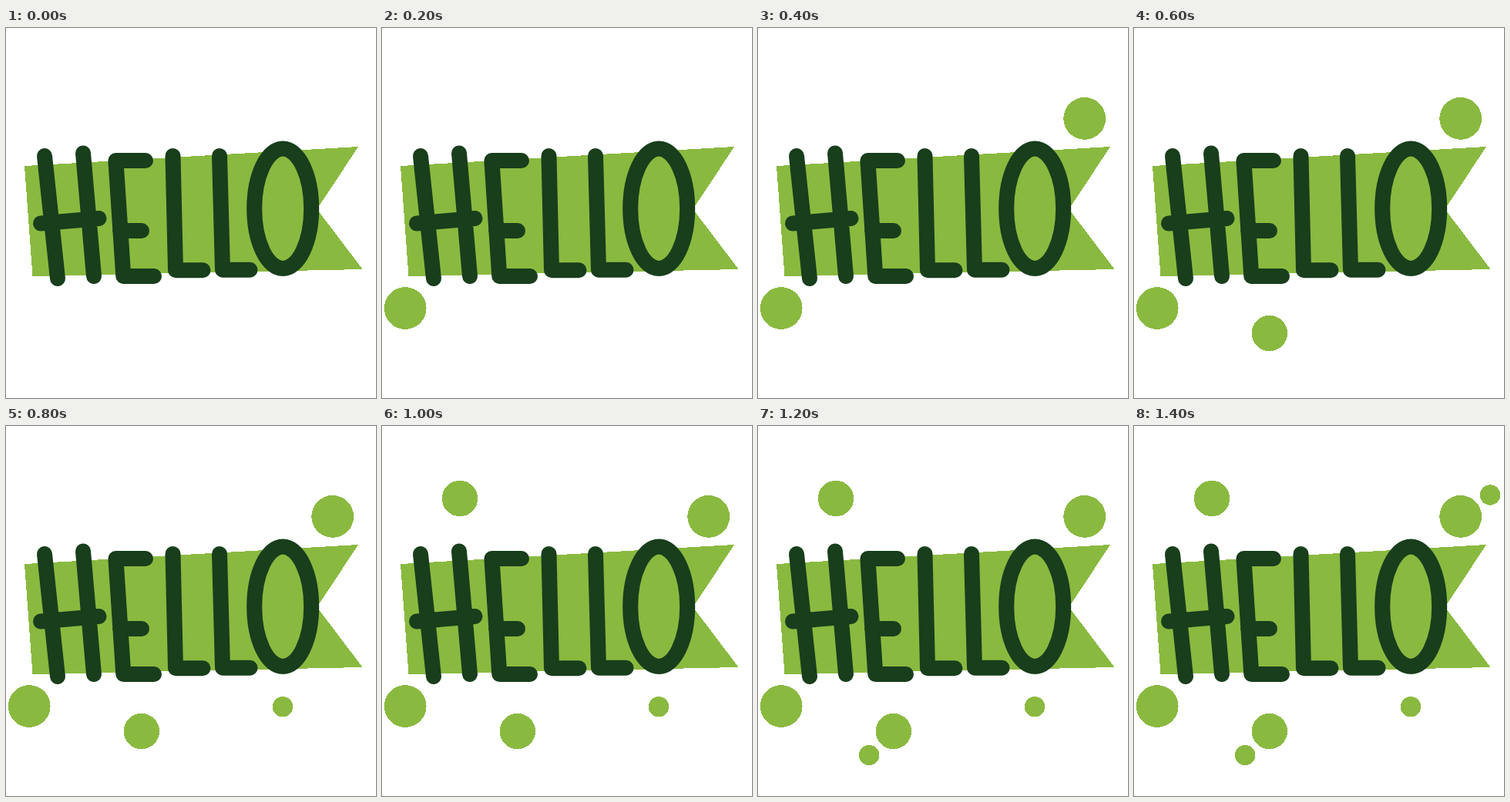
An HTML page for the animation above (1.6 s loop, 480x480 px).

```html
<!DOCTYPE html>
<html lang="en">
<head>
<meta charset="utf-8">
<title>Hello</title>
<style>
  html, body { margin: 0; width: 100%; height: 100%; overflow: hidden; background: #fff; }
  svg { display: block; width: 100%; height: 100%; }
  .light { fill: #8ab940; shape-rendering: crispEdges; }
  .letters { fill: none; stroke: #183e1c; stroke-width: 20; stroke-linecap: round; stroke-linejoin: round; }
  .big { r: 27.4px; }
  .medium { r: 23.2px; }
  .small { r: 13.2px; }
</style>
</head>
<body>
<svg viewBox="0 0 480 480" role="img" aria-label="Hello">
  <!-- dots in order of appearance -->
  <g id="dots" class="light">
    <circle class="big" cx="30.2" cy="363.5"/>
    <circle class="big" cx="423.7" cy="117.4"/>
    <circle class="medium" cx="175.8" cy="396"/>
    <circle class="small" cx="359" cy="364.3"/>
    <circle class="medium" cx="101" cy="94"/>
    <circle class="small" cx="144.2" cy="427"/>
    <circle class="small" cx="462" cy="89.5"/>
  </g>
  <path class="light" d="M24 179 L457 154 L403.5 235 L462.5 313 L34.5 322 Z"/>
  <g class="letters">
    <path d="M50 166 L67 325 M100 162.5 L114 322 M45 253.5 L120.5 247"/>
    <path d="M181 172 H142.4 L152.3 322 H192 M148 263 H176"/>
    <path d="M216.5 166 L220 314.2 H255.5"/>
    <path d="M277 166 L281 313.7 H316.5"/>
    <ellipse cx="359.2" cy="234.3" rx="37" ry="77.7"/>
  </g>
</svg>
<script>
  const STEP = 200;
  const dots = [...document.getElementById('dots').children];
  const loop = STEP * (dots.length + 1);

  // one more dot pops in at every step
  function draw(time) {
    const shown = Math.floor((time % loop) / STEP);
    dots.forEach((dot, i) => dot.setAttribute('visibility', i < shown ? 'visible' : 'hidden'));
  }

  const start = performance.now();
  function tick() {
    draw(performance.now() - start);
    requestAnimationFrame(tick);
  }
  tick();
</script>
</body>
</html>
```
